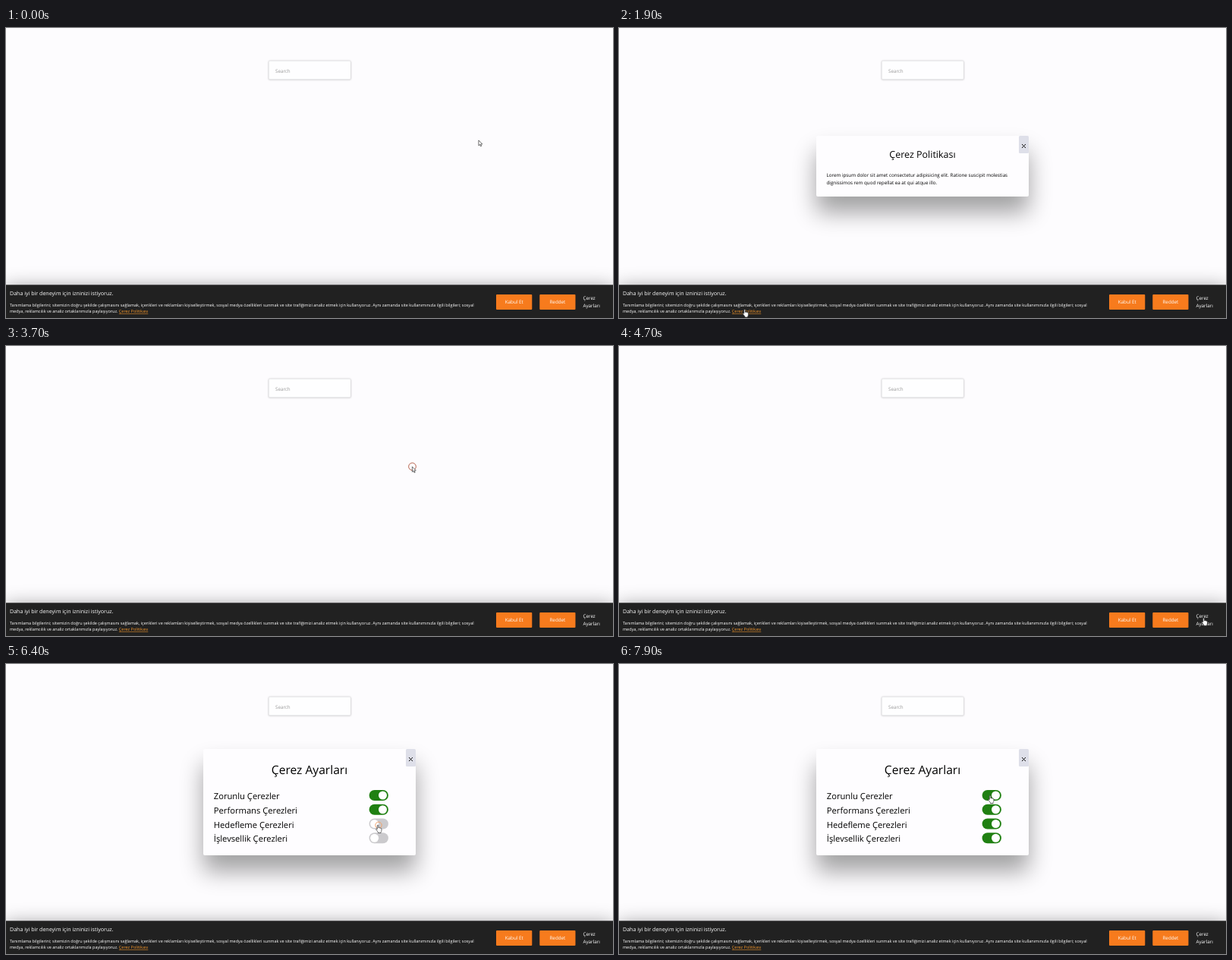
An HTML page for the animation above (8000 ms loop, 800 by 382 pixels).

```html
<!DOCTYPE html>
<html lang="tr">
<head>
<meta charset="utf-8">
<title>Çerez</title>
<style>
  html, body { margin: 0; height: 100%; overflow: hidden; background: #fdfcfe; }
  svg { display: block; width: 100%; height: 100%; }
  text { font: 6.27px "Open Sans", "Noto Sans", sans-serif; text-rendering: geometricPrecision; white-space: pre; }
  .mid { text-anchor: middle; }
  .white { fill: #fff; }
  .small { font-size: 5.51px; }
  .lead { font-size: 7.08px; }
  .label { font-size: 11.2px; }
  .shadow { filter: blur(15.5px); opacity: .36; }
  .bar { filter: blur(14.6px); opacity: .56; }
  .soft { filter: blur(1.3px); opacity: .23; }
  .link { fill: #f3962a; text-decoration: underline; }
  .cursor { fill: #fff; stroke: #333; stroke-width: .7; stroke-linejoin: round; }
</style>
</head>
<body>
<svg viewBox="0 0 800 382">
  <rect class="soft" x="346" y="43.3" width="108.5" height="25" rx="1.5"/>
  <rect x="346.5" y="43.5" width="107.5" height="24" rx="1.5" fill="#fefeff"/>
  <text x="355" y="58.6" fill="#999">Search</text>

  <rect class="bar" x="-2" y="346" width="804" height="50"/>
  <rect y="338.3" width="800" height="44" fill="#212121"/>
  <g class="white">
    <text class="lead" x="5" y="352">Daha iyi bir deneyim için izninizi istiyoruz.</text>
    <text class="small" x="5" y="366.8">Tanımlama bilgilerini; sitemizin doğru şekilde çalışmasını sağlamak, içerikleri ve reklamları kişiselleştirmek, sosyal medya özellikleri sunmak ve site trafiğimizi analiz etmek için kullanıyoruz. Aynı zamanda site kullanımınızla ilgili bilgileri; sosyal</text>
    <text class="small" x="5" y="375.4">medya, reklamcılık ve analiz ortaklarımızla paylaşıyoruz. <tspan class="link">Çerez Politikası</tspan></text>
    <rect x="646" y="351" width="47.3" height="20" rx="1" fill="#f77b1d"/>
    <rect x="703.3" y="351" width="47.2" height="20" rx="1" fill="#f77b1d"/>
    <text class="mid" x="669.7" y="363.2">Kabul Et</text>
    <text class="mid" x="726.9" y="363.2">Reddet</text>
    <text x="760.5" y="358.2">Çerez</text>
    <text x="760.5" y="368.3">Ayarları</text>
  </g>

  <g id="policy">
    <rect class="shadow" x="260" y="163" width="280" height="80"/>
    <rect x="260" y="142" width="280" height="80" rx="2" fill="#fefdff"/>
    <text class="mid" x="400" y="170.8" style="font-size:12.5px">Çerez Politikası</text>
    <text x="273.5" y="196.3">Lorem ipsum dolor sit amet consectetur adipisicing elit. Ratione suscipit molestias</text>
    <text x="273.5" y="206.3">dignissimos rem quod repellat ea at qui atque illo.</text>
    <rect x="527" y="142" width="13" height="23" rx="1.5" fill="#dedfe9"/>
    <path d="M531 153l5 5m0-5l-5 5" stroke="#111" stroke-width="1"/>
  </g>

  <g id="settings">
    <rect class="shadow" x="260" y="133" width="280" height="140"/>
    <rect x="260" y="112" width="280" height="140" rx="2" fill="#fefdff"/>
    <text class="mid" x="400" y="144.6" style="font-size:15.6px">Çerez Ayarları</text>
    <rect x="527" y="112" width="13" height="23" rx="1.5" fill="#dedfe9"/>
    <path d="M531 123l5 5m0-5l-5 5" stroke="#111" stroke-width="1"/>
    <g id="rows"></g>
  </g>

  <circle id="ring" fill="none" stroke-width="1"/>
  <g id="pointer">
    <path id="arrow" class="cursor" d="M.4 .4v7l1.6-1.5 1.1 2.5 1.1-.5-1.1-2.4h2.2z"/>
    <path id="hand" class="cursor" d="M-1.2 5.6V1q0-.8.8-.8t.8.8v2.8q.7-.5 1.4.1.8-.4 1.3.3 1.3-.2 1.3 1v2.4q0 1-.8 1.9v1H-.1v-1L-2.7 6.2q-.3-1 .5-1z"/>
    <path id="beam" d="M-1.3-3.3H-.3L0-3 .3-3.3h1M0-3v6M-1.3 3.3h1L0 3l.3.3h1" fill="none" stroke="#ddd" stroke-width=".7"/>
  </g>
</svg>
<script>
const LOOP = 8000;
const $ = id => document.getElementById(id);
const clamp = v => Math.max(0, Math.min(1, v));
const mix = (a, b, p) => a + (b - a) * p;

// time, x, y of the pointer
const path = [
  [0, 622.5, 147.5], [250, 622.5, 147.5], [1100, 169, 361], [1200, 167.5, 363.5],
  [1500, 166, 370.5], [2050, 166, 370.5], [2500, 254, 323], [2900, 492, 185],
  [3300, 535, 158.5], [3850, 535, 158.5], [4400, 771, 358], [4800, 771, 358],
  [5500, 490.8, 207], [5600, 490.6, 205], [5800, 490.5, 189], [6000, 490.5, 189],
  [6250, 490.5, 212], [6550, 490.5, 212], [6900, 489.6, 230], [7350, 489.6, 230],
  [7800, 489.5, 173], [LOOP, 489.5, 173]
];
const clicks = [1650, 3590, 4750, 5830, 6330, 7040];
const rows = [
  ["Zorunlu Çerezler", -1000], ["Performans Çerezleri", 5930],
  ["Hedefleme Çerezleri", 6430], ["İşlevsellik Çerezleri", 7140]
];
const rowY = i => 173 + i * 18.75;

$("rows").innerHTML = rows.map(([name], i) => `
  <text class="label" x="273.8" y="${rowY(i) + 5}">${name}</text>
  <rect class="track" x="478.6" y="${rowY(i) - 7}" width="25.3" height="14" rx="7"/>
  <circle class="knob white" cy="${rowY(i)}" r="5.5"/>`).join("");
const tracks = document.querySelectorAll(".track");
const knobs = document.querySelectorAll(".knob");

// Monotone cubic through the path points, so the pointer never overshoots a stop
const slope = (i, k) => (path[i + 1][k] - path[i][k]) / (path[i + 1][0] - path[i][0]);
function tangent(i, k) {
  if (i < 1 || i > path.length - 2) return 0;
  const a = slope(i - 1, k), b = slope(i, k);
  return a * b > 0 ? 2 * a * b / (a + b) : 0;
}
function locate(t) {
  let i = 0;
  while (i < path.length - 2 && t >= path[i + 1][0]) i++;
  const span = path[i + 1][0] - path[i][0], u = (t - path[i][0]) / span;
  return [1, 2].map(k => {
    const s = u * u * (3 - 2 * u), v = 1 - u;
    return mix(path[i][k], path[i + 1][k], s) +
      span * u * v * (tangent(i, k) * v - tangent(i + 1, k) * u);
  });
}

function shapeAt(x, y, policy, settings) {
  const within = (l, t, r, b) => x >= l && x <= r && y >= t && y <= b;
  if (within(148, 368.5, 187, 377) || within(760, 350, 783, 370) ||
      within(646, 351, 693, 371) || within(703, 351, 750, 371) ||
      policy && within(527, 142, 540, 165) ||
      settings && within(478, 166, 504, 237)) return "hand";
  if (within(5, 361, 617, 368.5) || within(5, 345, 142, 354) ||
      policy && within(273, 190, 513, 208)) return "beam";
  return "arrow";
}

function draw(t) {
  const policy = t >= 1750 && t < 3660, settings = t >= 4850;
  $("policy").style.display = policy ? "" : "none";
  $("settings").style.display = settings ? "" : "none";

  rows.forEach(([, on], i) => {
    const p = clamp((t - on) / 300), s = p * p * (3 - 2 * p);
    knobs[i].setAttribute("cx", mix(485.6, 496.5, s));
    tracks[i].setAttribute("fill", `rgb(${mix(203, 32, s)},${mix(202, 128, s)},${mix(205, 18, s)})`);
  });

  const [x, y] = locate(t), shape = shapeAt(x, y, policy, settings);
  $("pointer").setAttribute("transform", `translate(${x} ${y})`);
  for (const id of ["arrow", "hand", "beam"]) $(id).style.display = id === shape ? "" : "none";

  const age = Math.min(...clicks.map(c => t < c ? 1e4 : t - c));
  const ring = $("ring");
  ring.setAttribute("cx", x + .5);
  ring.setAttribute("cy", y + .3);
  ring.setAttribute("r", mix(3, 5, clamp(age / 120)));
  ring.setAttribute("stroke", shape === "arrow" ? "#b2563f" : "#f2a067");
  ring.setAttribute("opacity", age < 250 ? 1 - clamp((age - 100) / 150) : 0);
}

function tick(now) {
  draw(now % LOOP);
  requestAnimationFrame(tick);
}
requestAnimationFrame(tick);
</script>
</body>
</html>
```
